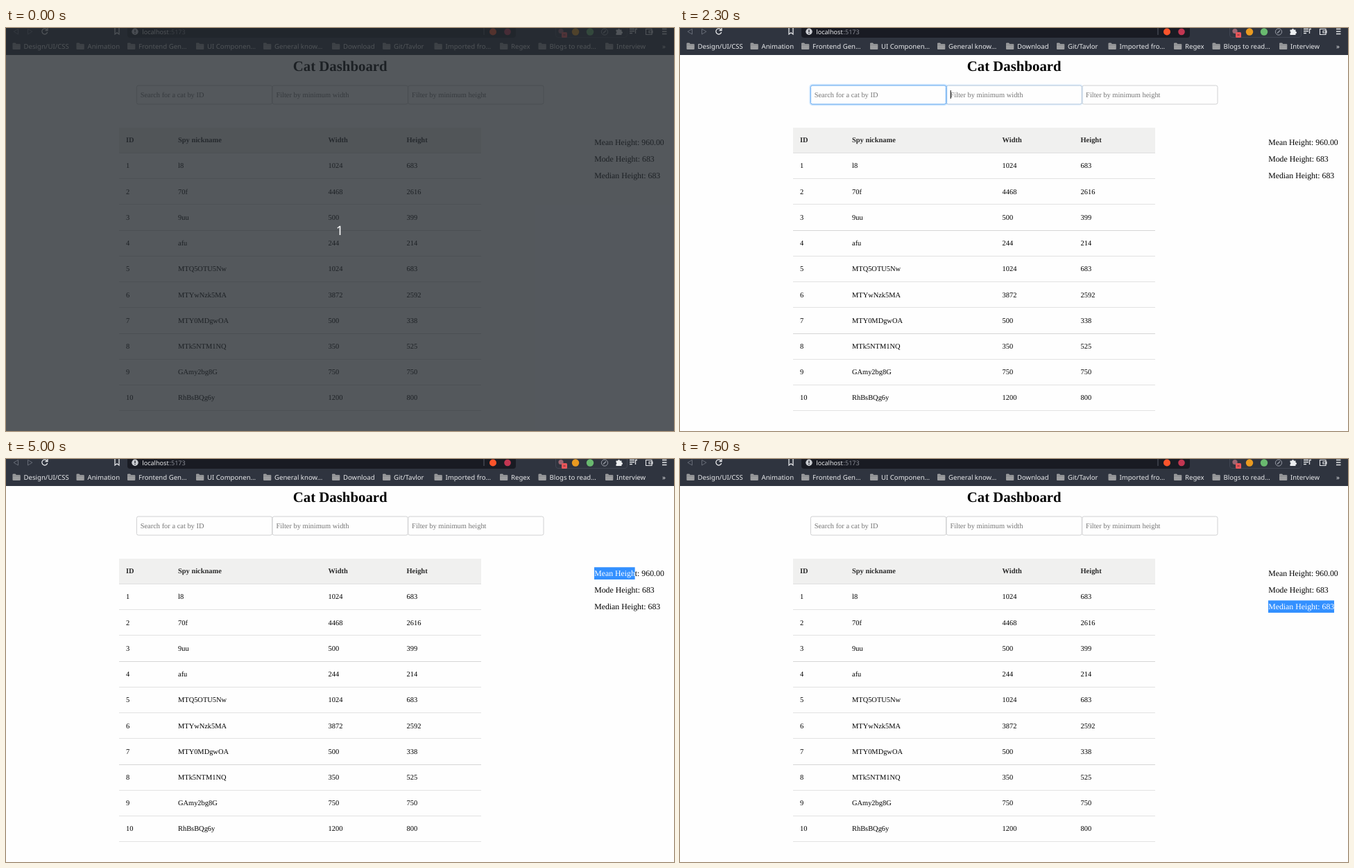
These frames come from a looping animation (963 px wide and 582 px high, 8000 ms). An HTML page:

```html
<!DOCTYPE html>
<html lang="en">
<head>
<meta charset="utf-8">
<title>Cat Dashboard</title>
<style>
  html, body { margin: 0; width: 100%; height: 100%; overflow: hidden; background: #fefefe; }
  svg { display: block; text-rendering: geometricPrecision; }
  text { font: 10.43px "Liberation Serif", serif; white-space: pre; }
  .title { font-size: 20.8px; font-weight: bold; text-anchor: middle; }
  .head { font-weight: bold; fill: #2b2b2b; }
  .hint { fill: #757575; }
  .stat { font-size: 11.8px; }
  .ui { font: 9.6px "Noto Sans", sans-serif; fill: #e9eaec; }
  .count { font: 18.5px "Noto Sans", sans-serif; fill: #fff; text-anchor: middle; }
</style>
</head>
<body>
<svg id="stage" width="963" height="582" viewBox="0 0 963 582">
  <rect width="963" height="39" fill="#2f343f"/>
  <path d="M175 0H735V10Q735 14 731 14H179Q175 14 175 10Z" fill="#191b23"/>
  <g fill="none" stroke="#e4e5e8" stroke-width="1.3">
    <path d="M17.500 1.500V9L11 5.200ZM31.500 1.500V9L38 5.200Z" stroke="#666b76" stroke-width="1"/>
    <path d="M59 2.500A4 4 0 1 0 59.700 6M60 0V3.500H56.500"/>
    <path d="M157 0V9L160 6.700L163 9V0"/>
    <path d="M689 0V10" stroke="#565a66" stroke-width="1"/>
    <path d="M792.500 0V10Q792.500 13.500 796 13.500H892Q895.500 13.500 895.500 10V0" stroke="#414652" stroke-width="1"/>
    <circle cx="863" cy="5.500" r="4.600" stroke="#9a9ea8" stroke-width="1"/>
    <path d="M861 7.500L865 3.500" stroke="#9a9ea8"/>
    <path d="M899 1.500H906M899 4.500H906M899 7.500H903M907.500 8V1.500H910"/>
    <path d="M922.500 1.500H931V9.500H922.500ZM927 4H932V7H927Z" stroke-width="1.100"/>
    <path d="M946 1.500H952.500M946 5H952.500M946 8.500H952.500"/>
  </g>
  <circle cx="186" cy="5.300" r="4.700" fill="#c9cbd0"/>
  <path d="M186 2.500V6M186 7V8.300" stroke="#191b23" stroke-width="1.300"/>
  <circle cx="702" cy="5.500" r="5" fill="#fb542b"/>
  <circle cx="723" cy="5.500" r="4.800" fill="#c23652"/>
  <circle cx="800" cy="4.500" r="3.600" fill="#9c6570"/>
  <rect x="801" y="6" width="8" height="8" rx="1.500" fill="#e8565a"/>
  <path d="M803.500 10H806.500" stroke="#5b2b30"/>
  <circle cx="821" cy="5.500" r="5.200" fill="#e99a20"/>
  <circle cx="842" cy="5.500" r="5.200" fill="#69b96f"/>
  <path d="M879.500 2.500H882A1.500 1.500 0 0 1 885 2.500H887.500V5A1.500 1.500 0 0 1 887.500 8V10H879.500V7.500A1.300 1.300 0 0 0 879.500 5Z" fill="#eceef0"/>
  <g id="page"></g>
  <g id="veil">
    <rect width="963" height="582" fill="#24292f" fill-opacity=".78"/>
    <text class="count" x="481" y="298.500">1</text>
  </g>
</svg>
<script>
const page = document.getElementById('page'), veil = document.getElementById('veil');
const clamp = v => Math.max(0, Math.min(1, v));

function add(tag, attrs, parent = page, content = '') {
  const el = document.createElementNS('http://www.w3.org/2000/svg', tag);
  for (const k in attrs) el.setAttribute(k, attrs[k]);
  el.textContent = content;
  return parent.appendChild(el);
}
const label = (x, y, str, cls = '') => add('text', { x, y, class: cls }, page, str);
const box = (x, y, width, height, fill, more) => add('rect', { x, y, width, height, fill, ...more });

// Browser bar
label(196.3, 8.7, 'localhost', 'ui').style.fontSize = '9.1px';
Object.assign(label(235.5, 8.7, ':5173', 'ui').style, { fontSize: '9.1px', fill: '#8b8e97' });
[[25.5, 'Design/UI/CSS'], [117.5, 'Animation'], [191, 'Frontend Gen…'], [290, 'UI Componen…'],
 [387, 'General know…'], [486, 'Download'], [559, 'Git/Tavlor'], [633.5, 'Imported fro…'],
 [728, 'Regex'], [783.5, 'Blogs to read…'], [880, 'Interview']].forEach(([x, name]) => {
  add('path', { d: `M${x - 16} 22.5q0-1 1-1h3l1.300 1.500h5q1 0 1 1v6q0 1-1 1h-9.300q-1 0-1-1z`, fill: '#9b9c9e' });
  add('path', { d: `M${x - 16} 24.500h11.300`, stroke: '#77797d', 'stroke-width': .6 });
  label(x, 30, name, 'ui');
});
label(946, 29.5, '»', 'ui');

// Search fields
label(481.7, 61.5, 'Cat Dashboard', 'title');
const step = 195.7;
const frame = (i, stroke, parent) => add('rect', {
  x: 188.4 + step * i, y: 83, width: step - .5, height: 27, rx: 2.5, fill: '#fefefe', stroke, 'stroke-width': 1
}, parent);
const hints = ['Search for a cat by ID', 'Filter by minimum width', 'Filter by minimum height'];
hints.forEach((_, i) => frame(i, '#d0d1d2'));
const fields = [
  { from: 1440, to: 2240, caret: [[1500, 2100]] },
  { from: 2240, to: 3150, caret: [[2300, 2900]] },
  { from: 3150, to: 4740, caret: [[3300, 4000], [4500, 4800]] }
];
fields.forEach((f, i) => {
  f.ring = add('g', {});
  const glow = frame(i, '#409eff', f.ring);
  glow.setAttribute('stroke-width', 4.5);
  glow.setAttribute('stroke-opacity', .3);
  frame(i, '#409eff', f.ring);
});
fields.forEach((f, i) => {
  label(193.7 + step * i, 99.6, hints[i], 'hint');
  f.bar = box(194 + step * i, 90, 1, 12, '#000');
});

// Table
box(163, 144, 522, 37, '#f0f0ef');
const cols = [173, 248, 464.5, 577.5];
const row = (y, cells, cls) => cells.forEach((c, i) => label(cols[i], y, c, cls));
row(165.2, ['ID', 'Spy nickname', 'Width', 'Height'], 'head');
box(163, 180, 522, 1, '#dfdfdf');
['l8 1024 683', '70f 4468 2616', '9uu 500 399', 'afu 244 214', 'MTQ5OTU5Nw 1024 683',
 'MTYwNzk5MA 3872 2592', 'MTY0MDgwOA 500 338', 'MTk5NTM1NQ 350 525', 'GAmy2bg8G 750 750',
 'RhBsBQg6y 1200 800'].forEach((line, i) => {
  row(202.4 + 37.22 * i, [i + 1, ...line.split(' ')]);
  box(163, 180 + Math.round(37.22 * (i + 1)), 522, 1, i % 4 == 2 ? '#d6d6d6' : '#e2e2e2');
});

// Statistics with drag selection
const stats = [
  { str: 'Mean Height: 960.00', from: 4800, full: 5200, to: 6100 },
  { str: 'Mode Height: 683', from: 6100, full: 6400, to: 7200 },
  { str: 'Median Height: 683', from: 7200, full: 7500, to: 8000 }
];
stats.forEach((s, i) => {
  s.mark = box(848, 156.3 + 24 * i, 0, 17.7, '#3390ff');
  const text = label(848.2, 169 + 24 * i, '', 'stat');
  s.picked = add('tspan', { fill: '#fff' }, text);
  s.rest = add('tspan', {}, text);
});

function draw(t) {
  veil.style.display = t < 100 ? '' : 'none';
  for (const f of fields) {
    f.ring.style.opacity = clamp((t - f.from) / 250) - clamp((t - f.to) / 250);
    f.bar.style.display = f.caret.some(([a, b]) => t >= a && t < b) ? '' : 'none';
  }
  for (const s of stats) {
    const part = t < s.to ? clamp((t - s.from) / (s.full - s.from)) : 0;
    const n = Math.round(part * s.str.length);
    s.picked.textContent = s.str.slice(0, n);
    s.rest.textContent = s.str.slice(n);
    s.mark.setAttribute('width', n ? s.picked.getComputedTextLength() : 0);
  }
}

const start = performance.now();
function tick() {
  const t = (performance.now() - start) % 8000;
  draw(Math.floor(t / 100) * 100);
  requestAnimationFrame(tick);
}
tick();
</script>
</body>
</html>
```
